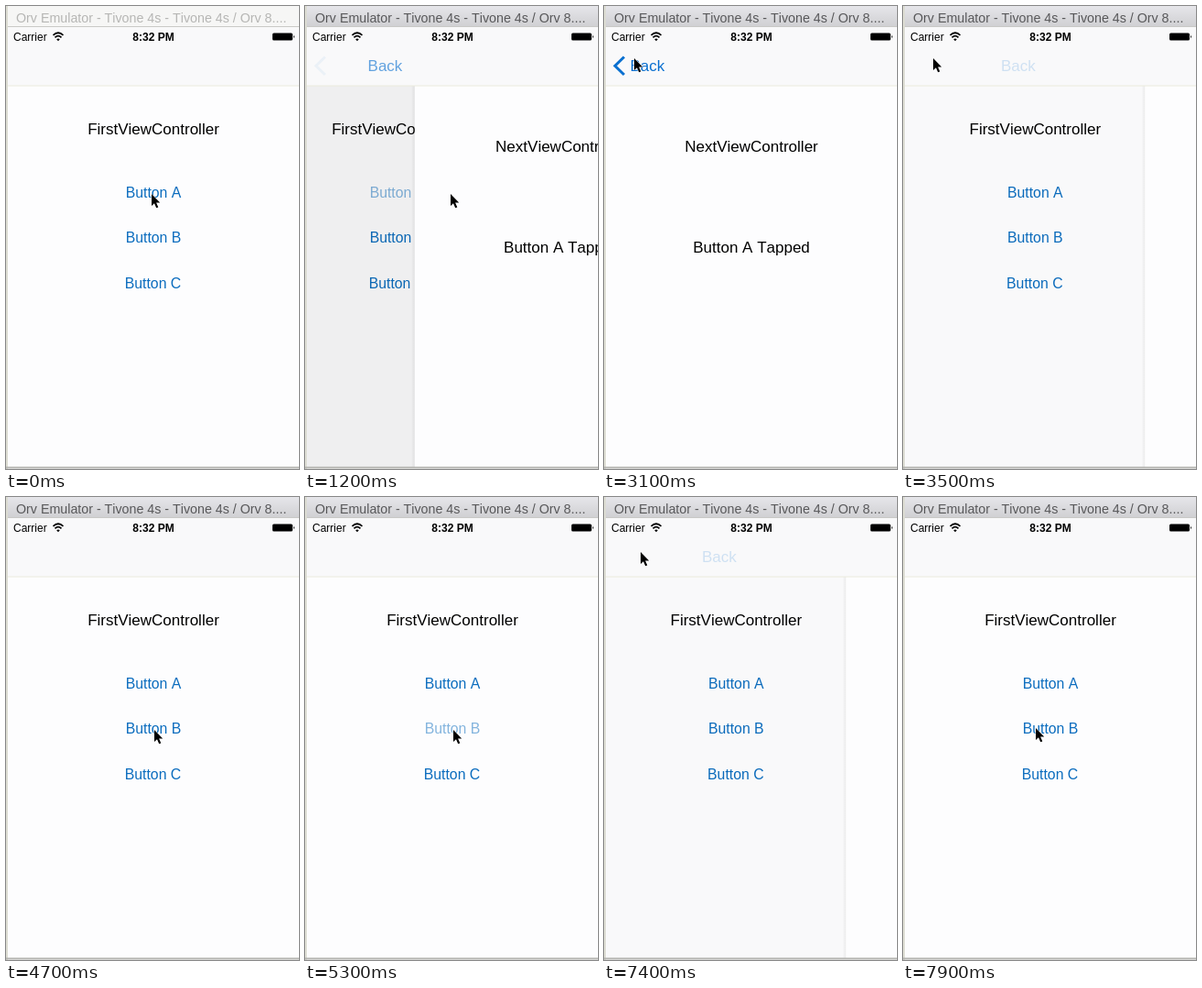
An HTML page that plays this animation: 320 px wide and 505 px high, repeating every 8000 ms.

```html
<!DOCTYPE html>
<html lang="en">
<head>
<meta charset="utf-8">
<title>Navigation demo</title>
<style>
  html, body { margin: 0; width: 100%; height: 100%; overflow: hidden; background: #fdfdfe; }
  svg { display: block; width: 100vw; height: 100vh; }
  text { font: 17px "Liberation Sans", Arial, sans-serif; font-kerning: none; }
  .mid { text-anchor: middle; }
  .button { font-size: 15.8px; fill: #0a6cbe; }
  .small { font-size: 12px; }
  .bold { font-weight: bold; }
  #title { font-size: 14.25px; }
</style>
</head>
<body>
<svg viewBox="0 0 320 505">
  <defs>
    <linearGradient id="active" x2="0" y2="1">
      <stop stop-color="#e6e6ea"/><stop offset="1" stop-color="#d0d0d3"/>
    </linearGradient>
    <linearGradient id="shade">
      <stop stop-opacity="0"/><stop offset="1" stop-opacity=".06"/>
    </linearGradient>
    <clipPath id="screen"><rect x="2" y="87" width="318" height="416"/></clipPath>
  </defs>

  <g clip-path="url(#screen)">
    <rect y="87" width="320" height="418" fill="#fdfdfe"/>
    <g id="first">
      <text class="mid" x="161" y="139.5">FirstViewController</text>
      <text class="mid button" x="161" y="209">Button A</text>
      <text class="mid button" x="161" y="258">Button B</text>
      <text class="mid button" x="160.5" y="308">Button C</text>
    </g>
    <rect id="dim" y="87" width="320" height="418" fill-opacity=".09"/>
    <g id="next">
      <rect x="-4" y="87" width="4" height="418" fill="url(#shade)"/>
      <rect y="87" width="320" height="418" fill="#fdfdfe"/>
      <text class="mid" x="161" y="158.5">NextViewController</text>
      <text class="mid" id="tapped" x="161" y="268.5"></text>
    </g>
  </g>

  <rect y="22" width="320" height="65" fill="#f9f9fa"/>
  <path d="M0 87H320" stroke="#ebebdc"/>
  <path id="chevron" d="M22 55.500L12 65.200L22 75" fill="none" stroke="#0a70d0" stroke-width="3"/>
  <text id="back" x="28.500" y="71" fill="#0a70d0">Back</text>

  <text class="small" x="8" y="38">Carrier</text>
  <g fill="none" stroke="#000" stroke-width="1.700">
    <path d="M51.500 31.800Q57 26.700 62.500 31.800M53.500 34.300Q57 31 60.500 34.300"/>
    <path d="M55.200 36.300Q57 34.600 58.800 36.300L57 38.200Z" fill="#000" stroke="none"/>
  </g>
  <text class="small bold mid" x="161" y="38">8:32 PM</text>
  <rect x="291" y="29.500" width="22" height="8" rx="1.500"/>
  <path d="M314 32q2 1.500 0 3z"/>

  <rect id="bar" width="320" height="22"/>
  <path d="M0 22.500H320" stroke="#c9c9c6"/>
  <text id="title" x="11" y="17.700">Orv Emulator - Tivone 4s - Tivone 4s / Orv 8....</text>
  <path d="M1 0V505" stroke="#dcdcd2" stroke-width="2"/>
  <path d="M0 503.500H320" stroke="#b4b4b0" stroke-width="2"/>

  <path id="cursor" d="M0 0V13L3 10.200L5.200 15.300L7.300 14.400L5.100 9.400H9.200Z"
        stroke="#fff" paint-order="stroke"/>
</svg>
<script>
const LOOP = 8000, STEP = 100;
const $ = id => document.getElementById(id);
const buttons = document.querySelectorAll('.button');

// time, x, y of the pointer tip
const path = [
  [0, 159, 205], [1900, 159, 205], [2100, 58, 120], [2300, 33, 57],
  [3800, 33, 57], [4700, 162, 254], [5800, 162, 254], [6100, 55, 60],
  [6400, 40, 60], [7600, 40, 60], [7900, 145, 252], [LOOP, 145, 252]
];
const visits = [
  { press: 700, push: 1000, pop: 3200, name: 'A' },
  { press: 5000, push: 5300, pop: 7100, name: 'B' }
];

// critically damped spring that settles after 800 ms
function spring(ms) {
  if (ms <= 0) return 0;
  if (ms >= 800) return 1;
  const x = ms * 0.0106;
  return 1 - (1 + x) * Math.exp(-x);
}

function pointer(t) {
  const i = path.findIndex(k => k[0] > t);
  const [t0, x0, y0] = path[i - 1], [t1, x1, y1] = path[i];
  const u = (t - t0) / (t1 - t0), e = u * u * (3 - 2 * u);
  return [x0 + (x1 - x0) * e, y0 + (y1 - y0) * e];
}

const move = (id, x, y = 0) => $(id).setAttribute('transform', `translate(${x} ${y})`);

function draw(t) {
  const n = t < visits[1].press ? 0 : 1;
  const { press, push, pop, name } = visits[n];
  const popping = t >= pop;
  const depth = popping ? 1 - spring(t - pop) : spring(t - push);

  move('first', -96 * depth);
  move('next', 320 * (1 - depth));
  move('back', (popping ? 95 : 107) * (1 - depth));
  move('cursor', ...pointer(t));
  $('next').style.display = depth ? '' : 'none';
  $('dim').style.opacity = depth;
  $('back').style.opacity = depth;
  $('chevron').style.opacity = depth ** 6;
  $('tapped').textContent = `Button ${name} Tapped`;
  buttons.forEach((b, i) => b.style.opacity = i === n && t >= press && !popping ? 0.5 : 1);

  const active = t >= 100;
  $('bar').setAttribute('fill', active ? 'url(#active)' : '#f6f6f5');
  $('title').setAttribute('fill', active ? '#58585a' : '#b6b6b4');
}

function frame(now) {
  draw(Math.floor(now % LOOP / STEP) * STEP);
  requestAnimationFrame(frame);
}
draw(0);
requestAnimationFrame(frame);
</script>
</body>
</html>
```
